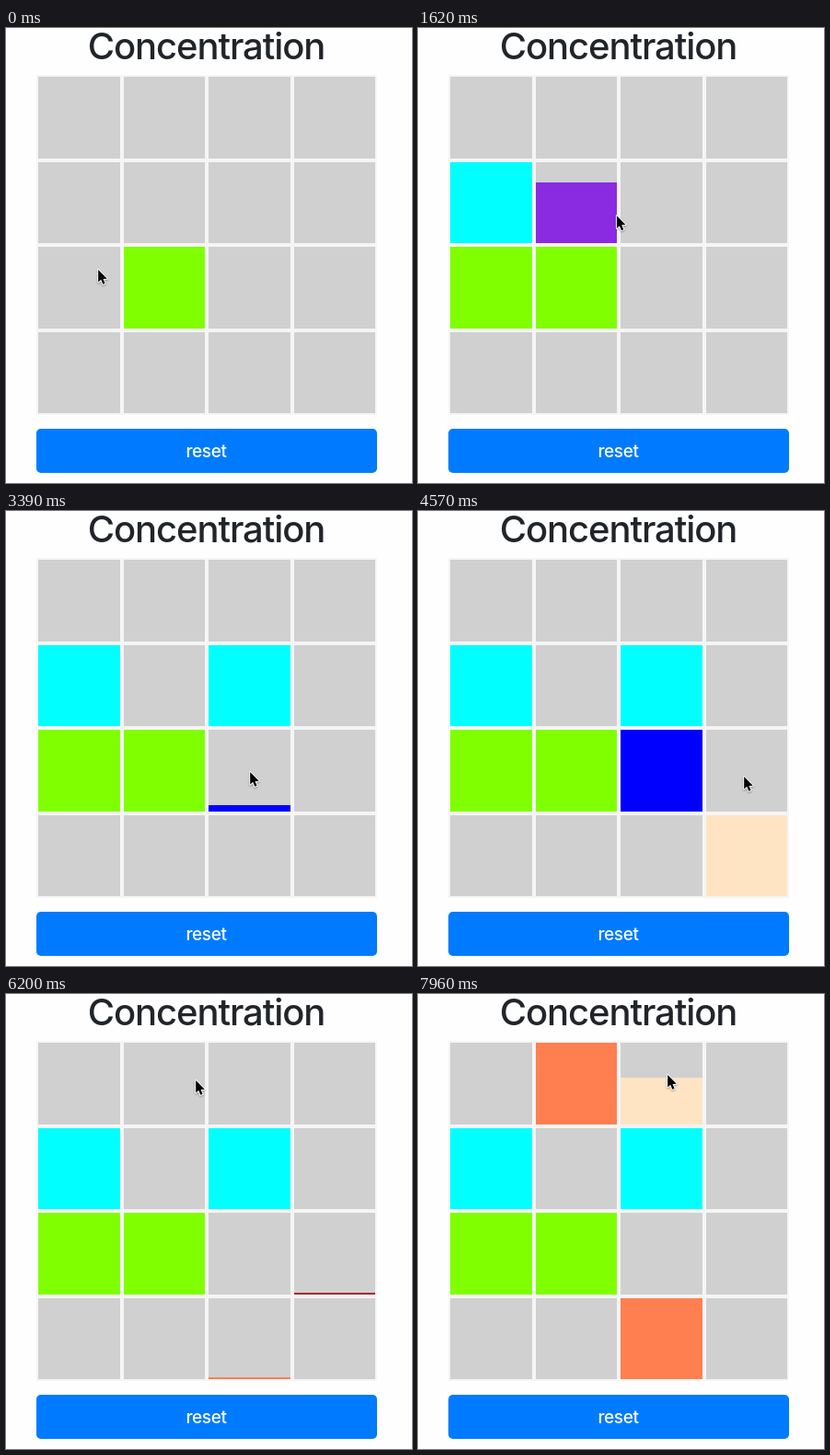
Animation of 441x495 px, one loop 8 s. Source, as an HTML page with a canvas:

```html
<!DOCTYPE html>
<html lang="en">
<head>
<meta charset="utf-8">
<title>Concentration</title>
<style>
html, body { margin: 0; width: 100%; height: 100%; overflow: hidden; background: #fefefe; }
canvas { display: block; }
</style>
</head>
<body>
<canvas id="stage" width="441" height="495"></canvas>
<script>
const ctx = document.getElementById('stage').getContext('2d');
const LOOP = 8000, STEP = 147.4, FLIP = 500;
const LEFT = 33, TOP = 51, PITCH = 92.5, SIZE = 88.5;
const GREEN = '#80ff00', CYAN = '#00ffff', PURPLE = '#8a2be2', BLUE = '#0000ff',
      PEACH = '#ffe4c4', BROWN = '#a52a2a', CORAL = '#ff7f50';

// Clicks come in pairs; the spot decides which card turns.
const clicks = [
  [-700, 150, 262, GREEN], [200, 99, 261, GREEN],
  [682, 116, 201, CYAN], [1250, 182, 200, PURPLE],
  [1964, 266, 206, CYAN], [2650, 86, 196, CYAN],
  [3350, 264, 282, BLUE], [4075, 351, 361, PEACH],
  [4730, 353, 287, BROWN], [5202, 284, 367, CORAL],
  [6300, 205, 92, CORAL], [7338, 268, 345, CORAL],
  [7673, 270, 86, PEACH]
].map(([time, x, y, color]) => ({
  time, x, y, color,
  col: Math.floor((x - LEFT) / PITCH),
  row: Math.floor((y - TOP) / PITCH)
}));

const clamp = v => Math.max(0, Math.min(1, v));
const mix = (a, b, u) => a + (b - a) * u;

// A pair of different colours turns back one flip after its second click.
function hideTime(i) {
  const a = clicks[i & ~1], b = clicks[i | 1];
  return b && a.color !== b.color ? b.time + FLIP : Infinity;
}

// The pointer rests around each click and travels in the middle of the gap.
function pointerAt(t) {
  const next = clicks.findIndex(c => c.time > t);
  if (next < 0) return clicks[clicks.length - 1];
  const a = clicks[next - 1], b = clicks[next];
  const u = clamp(((t - a.time) / (b.time - a.time) - 0.35) / 0.4);
  const e = u * u * (3 - 2 * u);
  return { x: mix(a.x, b.x, e), y: mix(a.y, b.y, e) };
}

function drawCell(col, row, color, part = 1) {
  const x = LEFT + 2 + col * PITCH, y = TOP + 2 + row * PITCH;
  const x0 = Math.round(x), x1 = Math.round(x + SIZE);
  const y1 = Math.round(y + SIZE);
  const y0 = part === 1 ? Math.round(y) : Math.round(y1 - SIZE * part);
  ctx.fillStyle = color;
  ctx.fillRect(x0, y0, x1 - x0, y1 - y0);
}

function drawText(text, y, font, spacing, color) {
  ctx.font = font + ' Inter, sans-serif';
  ctx.letterSpacing = spacing;
  ctx.fillStyle = color;
  ctx.textAlign = 'center';
  ctx.fillText(text, 217.5, y);
}

function drawPointer({ x, y }) {
  ctx.save();
  ctx.translate(x + 0.5, y + 1);
  ctx.beginPath();
  [[0.7, 1], [0.7, 14.6], [3.7, 11.8], [5.8, 16.8], [8.1, 15.8], [6, 11], [10.3, 10.7]]
    .forEach(p => ctx.lineTo(...p));
  ctx.closePath();
  ctx.lineJoin = 'round';
  ctx.shadowColor = 'rgba(0,0,0,.35)';
  ctx.shadowBlur = 2;
  ctx.shadowOffsetY = 1;
  ctx.strokeStyle = '#fff';
  ctx.lineWidth = 2;
  ctx.stroke();
  ctx.shadowColor = 'transparent';
  ctx.fillStyle = '#000';
  ctx.fill();
  ctx.restore();
}

function draw(t) {
  ctx.fillStyle = '#fefefe';
  ctx.fillRect(0, 0, 441, 495);
  drawText('Concentration', 34, '500 40px', '-1.1px', '#212529');

  ctx.fillStyle = '#f5f5f5';
  ctx.fillRect(LEFT, TOP, 370, 370);
  for (let i = 0; i < 16; i++) drawCell(i % 4, i >> 2, '#d0d0d0');
  clicks.forEach((c, i) => {
    const part = clamp((t - c.time) / FLIP) - clamp((t - hideTime(i)) / FLIP);
    if (part > 0) drawCell(c.col, c.row, c.color, part);
  });

  ctx.fillStyle = '#007bff';
  ctx.beginPath();
  ctx.roundRect(LEFT, 436, 370, 48, 4.8);
  ctx.fill();
  drawText('reset', 467, '500 19px', '-0.4px', '#fff');

  drawPointer(pointerAt(t));
}

function frame() {
  const t = performance.now() % LOOP;
  draw(Math.floor((t + 6) / STEP) * STEP);
  requestAnimationFrame(frame);
}
frame();
</script>
</body>
</html>
```
